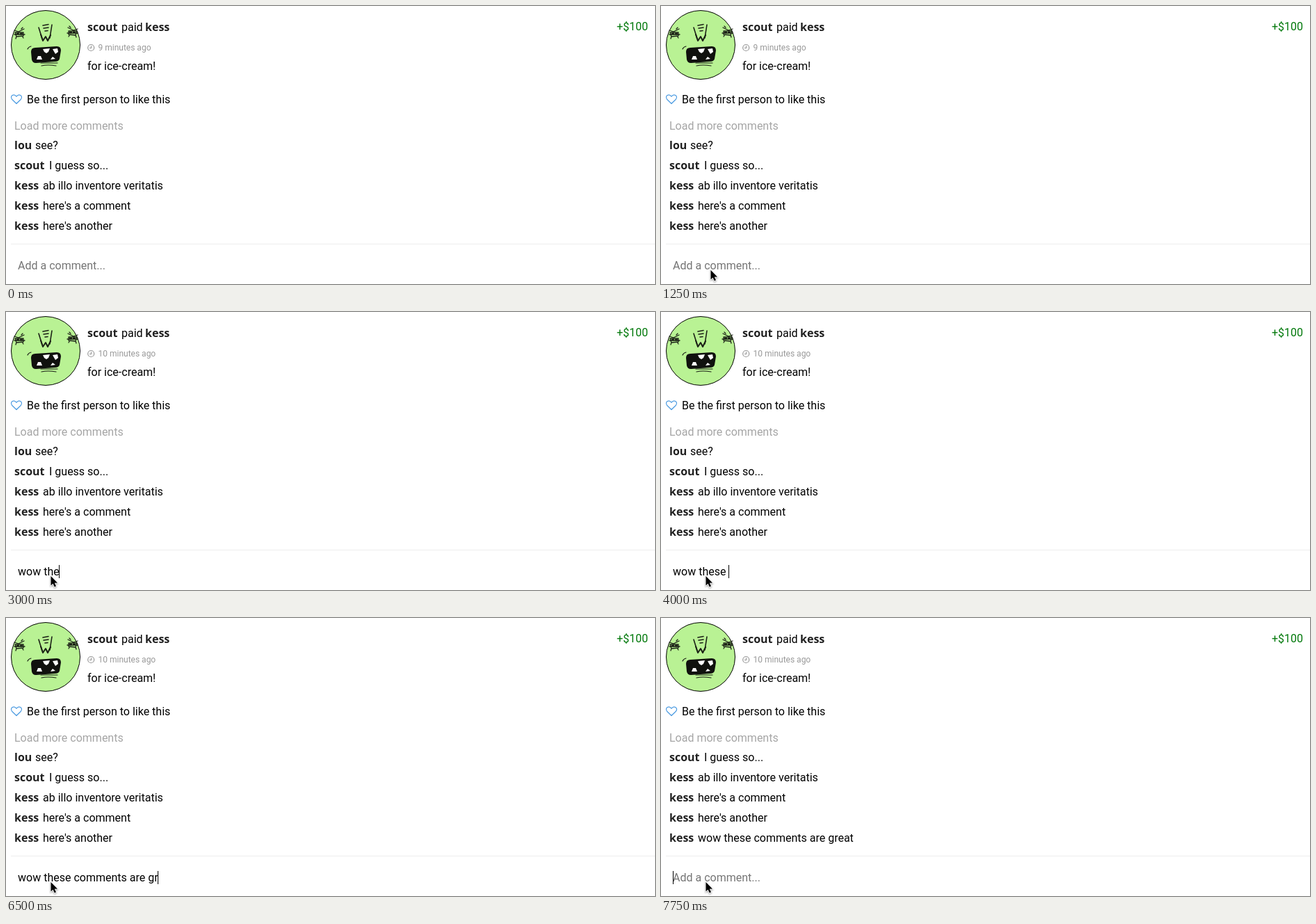
Animation, 933 px wide and 400 px high, one loop 8 s. Source, as an HTML page:

```html
<!DOCTYPE html>
<html lang="en">
<head>
<meta charset="utf-8">
<style>
  html, body { margin: 0; height: 100%; overflow: hidden; background: #fff; }
  svg { display: block; width: 933px; height: 400px; }
  text { font: 16px Roboto, sans-serif; white-space: pre; }
  .name { font: bold 16px "Noto Sans", sans-serif; fill: #212121; }
  .age { font-size: 12px; fill: #999; }
  .line { fill: none; stroke: #1b2016; stroke-linecap: round; stroke-linejoin: round; }
</style>
</head>
<body>
<svg viewBox="0 0 933 400">
  <circle cx="57" cy="56" r="49.5" fill="#b9f294" stroke="#000"/>
  <g class="line" stroke-width="1.6">
    <path d="M47 31 52 47M66 27 63 46M53 28 61 26.500M54 32 61 31M56 36 60 35.500"/>
    <path d="M50 41 53 50 57 44 60 50 64 42" stroke-width="2"/>
    <path d="M31 62Q32 59 36 58M50 82H74M51 86Q60 84 72 86" stroke-width="1.200"/>
    <g id="eye">
      <path d="M12 35 18 37 26 33M13 38H25V43L15 44ZM12 41H27M22 33 24 31M15 44 14 47M23 43 25 46" stroke-width="1.300"/>
      <path d="M16 40H18M21 40H23" stroke-width="2.400"/>
    </g>
    <use href="#eye" transform="matrix(-1 0 0 1 115 -2)"/>
  </g>
  <path d="M36 66Q36 60 42 60L73 58Q79 58 79 64L77 76Q76 80 70 80L43 82Q38 82 37 77Z" fill="#10110e"/>
  <path d="M53 62 63 61 61 66 58 68 55 66ZM67 62 74 61 75 66 71 69ZM44 77 46 72 50 72 52 77ZM64 77 67 73 71 76Z" fill="#fff"/>

  <text class="name" x="117" y="36">scout</text>
  <text x="166" y="36">paid</text>
  <text class="name" x="200" y="36">kess</text>
  <text x="923" y="35" text-anchor="end" fill="#00780a">+$100</text>
  <g fill="none" stroke="#999" stroke-width="1.200">
    <circle cx="122.200" cy="60" r="4.500"/>
    <path d="M122.500 57.200V60.500H120"/>
  </g>
  <text class="age" id="age" x="132.500" y="64"></text>
  <text x="117" y="92">for ice-cream!</text>
  <path d="M15 140.500 8.800 134.500C6 131.500 8 127.900 11.200 127.900 13 127.900 14.200 129.200 15 130.200 15.800 129.200 17 127.900 18.800 127.900 22 127.900 24 131.500 21.200 134.500Z"
        fill="none" stroke="#4a9ae1" stroke-width="1.200" stroke-linejoin="round"/>
  <text x="30" y="140">Be the first person to like this</text>
  <text x="12" y="178" fill="#a5a5a5">Load more comments</text>
  <g id="comments"></g>
  <path d="M7 342.500H933" stroke="#eee"/>
  <text id="input" x="17" y="379"></text>
  <rect id="caret" y="364" width="1" height="19"/>
  <path id="pointer" d="M0 0V13.500L3 10.700 5.200 15.600 7.500 14.600 5.300 9.800H9.500Z"
        stroke="#fff" stroke-width="1.600" paint-order="stroke" style="filter:drop-shadow(0 1px 1px #0006)"/>
</svg>
<script>
const LOOP = 8000, SENT = 7750;
const MESSAGE = 'wow these comments are great';
const TEXT_X = { lou: 42, scout: 62, kess: 53 };
const COMMENTS = [
  ['lou', 'see?'],
  ['scout', 'I guess so...'],
  ['kess', 'ab illo inventore veritatis'],
  ['kess', "here's a comment"],
  ['kess', "here's another"],
  ['kess', MESSAGE],
];
// [time, characters typed]
const TYPING = [[0, 0], [2250, 2], [2500, 4], [3000, 7], [3500, 9], [4000, 10], [4250, 11],
  [4500, 14], [5000, 15], [5250, 18], [5500, 19], [5750, 20], [6000, 23], [6500, 25],
  [6750, 26], [7000, 28], [SENT, 0]];
// [time, x, y]
const POINTER = [[0, -50, -50], [250, 101, 290], [500, 76, 366], [750, 73, 381],
  [1250, 71.5, 380], [1500, 64.5, 380]];

const el = id => document.getElementById(id);
const at = (steps, t) => steps.findLast(step => step[0] <= t);
const rows = first => COMMENTS.slice(first, first + 5).map(([name, text], i) => {
  const y = 206 + 29 * i;
  return `<text class="name" x="12" y="${y}">${name}</text><text x="${TEXT_X[name]}" y="${y}">${text}</text>`;
}).join('');

let shownFirst;
function draw(t) {
  const typed = MESSAGE.slice(0, at(TYPING, t)[1]);
  const input = el('input');
  input.textContent = typed || 'Add a comment...';
  input.setAttribute('fill', typed ? '#000' : '#757575');

  const caretOn = t >= 1500 && t < 2000 || t >= 2250 && t < 7500 || t >= SENT;
  const width = typed ? input.getComputedTextLength() : 0;
  el('caret').setAttribute('x', Math.floor(17 + width));
  el('caret').setAttribute('visibility', caretOn ? 'visible' : 'hidden');

  const [, x, y] = at(POINTER, t);
  el('pointer').setAttribute('transform', `translate(${x} ${y})`);
  el('age').textContent = `${t < 2250 ? 9 : 10} minutes ago`;

  const first = t < SENT ? 0 : 1;
  if (first !== shownFirst) el('comments').innerHTML = rows(shownFirst = first);
}

const start = performance.now();
function tick() {
  draw((performance.now() - start) % LOOP);
  requestAnimationFrame(tick);
}
tick();
</script>
</body>
</html>
```
